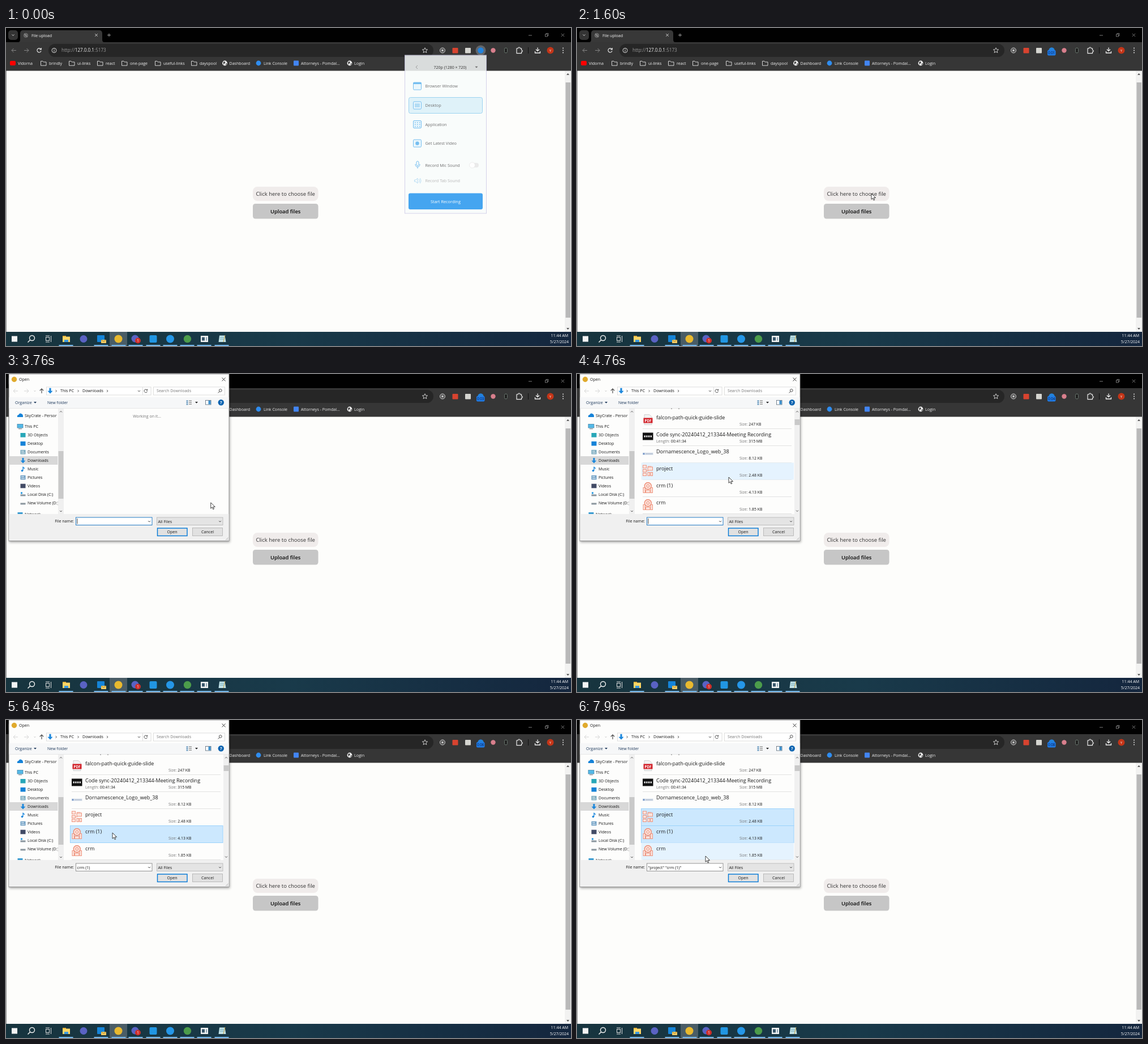
An HTML page that plays this animation: 998 px wide and 561 px high, repeating every 8 s.

```html
<!DOCTYPE html>
<html lang="en">
<head>
<meta charset="utf-8">
<title>File upload</title>
<style>
  html, body { margin: 0; width: 100%; height: 100%; overflow: hidden; background: #fdfdfb; }
  svg { display: block; width: 100vw; height: 100vh; }
  text { font-family: "Open Sans", "Noto Sans", sans-serif; white-space: pre; }
</style>
</head>
<body>
<svg id="stage" viewBox="0 0 998 561"></svg>
<script>
const LOOP = 8000;
const INK = '#1a1a1a';

const rect = (x, y, w, h, fill, extra = '') =>
  `<rect x="${x}" y="${y}" width="${w}" height="${h}" fill="${fill}" ${extra}/>`;
const disc = (x, y, r, fill, extra = '') =>
  `<circle cx="${x}" cy="${y}" r="${r}" fill="${fill}" ${extra}/>`;
const line = (d, stroke = INK, width = 1, extra = '') =>
  `<path d="${d}" fill="none" stroke="${stroke}" stroke-width="${width}" ${extra}/>`;
const shape = (d, fill, extra = '') => `<path d="${d}" fill="${fill}" ${extra}/>`;
const text = (x, y, s, fill = INK, size = 7.1, extra = '') =>
  `<text x="${x}" y="${y}" fill="${fill}" font-size="${size}" ${extra}>${s}</text>`;
const group = (id, body, extra = '') => `<g id="${id}" ${extra}>${body}</g>`;
const MID = 'text-anchor="middle"';
const END = 'text-anchor="end"';

const chevron = (x, y, color = '#444', r = 2) => line(`M${x - r} ${y - r / 2}l${r} ${r}l${r} ${-r}`, color, 0.9);
const chevronUp = (x, y, color = '#444', r = 2) => line(`M${x - r} ${y + r / 2}l${r} ${-r}l${r} ${r}`, color, 0.9);
const chevronRight = (x, y, color = '#444') => line(`M${x - 1} ${y - 2}l2 2l-2 2`, color, 0.9);
const triangle = (x, y, color, dir = 1) => shape(`M${x - 2.5} ${y - 1.3 * dir}h5l-2.5 ${2.8 * dir}z`, color);
const cross = (x, y, color, r = 3) => line(`M${x - r} ${y - r}l${2 * r} ${2 * r}m0 ${-2 * r}l${-2 * r} ${2 * r}`, color, 0.9);
const lens = (x, y, r, color, w) => disc(x, y, r, 'none', `stroke="${color}" stroke-width="${w}"`);
const arrow = (x, y, dx, color) => line(`M${x - 4 * dx} ${y}h${8 * dx}m${-3.5 * dx} -3.5l${3.5 * dx} 3.5l${-3.5 * dx} 3.5`, color, 1);
const downArrow = (x, y, s = 1) =>
  shape(`M${x - 1.6 * s} ${y - 5 * s}h${3.2 * s}v${5 * s}h${3 * s}l${-4.6 * s} ${5 * s}l${-4.6 * s} ${-5 * s}h${3 * s}z`, '#1e88dc');

function globe(x, y, color = '#f1f1f1') {
  return disc(x, y, 4.4, color) + shape(`M${x - 3} ${y - 2}l3 -1l1 2l-2 2l-1 2z`, '#444') + shape(`M${x + 1} ${y + 2}l2 -2l1 1l-2 2z`, '#444');
}

function bookmark([kind, x, label]) {
  const icons = {
    red: rect(x - 14, 58, 10, 8, '#f00', 'rx="2"'),
    folder: line(`M${x - 14.5} 58.5h3.5l1.2 1.5h4.8v6.2h-9.5z`, '#e4e4e4', 0.9),
    globe: globe(x - 8, 62),
    blue: disc(x - 9, 62, 4.4, '#2f8df0'),
    square: rect(x - 13, 57.5, 9, 9, '#4285f4', 'rx="1"')
  };
  return icons[kind] + text(x, 65, label, '#f0f0f0');
}

function browser() {
  const marks = [
    ['red', 21, 'Vidorna'], ['folder', 76, 'brindly'], ['folder', 126, 'ui-links'],
    ['folder', 176, 'react'], ['folder', 219, 'one-page'], ['folder', 278, 'useful-links'],
    ['folder', 342, 'dayspool'], ['globe', 394.5, 'Dashboard'], ['blue', 455, 'Link Console'],
    ['square', 521, 'Attorneys - Pomdal...'], ['globe', 615, 'Login']
  ];
  const star = 'M740 34.8l1.3 3l3.3 .3l-2.5 2.2l.8 3.2l-2.9 -1.7l-2.9 1.7l.8 -3.2l-2.5 -2.2l3.3 -.3z';
  return [
    rect(0, 0, 998, 26, '#010101'),
    rect(4, 4, 17, 17, '#343434', 'rx="5"'), chevron(12.5, 12.5, '#eee'),
    shape('M20 25.5q5 0 5 -5v-11q0 -5.5 5.5 -5.5h134q5.5 0 5.5 5.5v11q0 5 5 5z', '#383838'),
    disc(35, 13, 4.3, '#666'), line('M32 10l6 6', '#aaa', 0.9),
    text(45, 15.6, 'File upload', '#f4f4f4'),
    cross(159.5, 12.5, '#eee', 2.2), line('M179 12.5h6m-3 -3v6', '#aaa', 0.9),
    line('M923 13h6', '#888', 0.9), rect(952.5, 11, 4, 4, 'none', 'stroke="#888" stroke-width=".8"'),
    line('M954 11v-1.5h4v4h-1.5', '#888', 0.8), cross(983.5, 12.5, '#888', 2.6),
    rect(0, 25, 998, 50.5, '#363636'),
    rect(75, 28, 680, 23, '#262626', 'rx="11.5"'),
    arrow(14, 39.5, -1, '#858585'), arrow(36, 39.5, 1, '#858585'),
    line('M61.6 37.5a3.6 3.6 0 1 0 .4 3M62.3 35v3h-3', '#eee', 1.1),
    disc(85, 39.5, 4, 'none', 'stroke="#ddd"'), line('M85 38.7v3M85 36.8v1', '#ddd', 1),
    text(98, 42.4, '<tspan>http://</tspan><tspan fill="#f2f2f2">127.0.0.1</tspan>:5173', '#9a9a9a', 8.1),
    line(star, '#ddd', 0.9),
    disc(771, 39.5, 4.5, '#555', 'stroke="#ccc"'), disc(771, 39.5, 1.7, '#ccc'),
    rect(788.5, 35, 10, 9.5, '#d8432f', 'rx="1"'), rect(811, 35, 10, 9.5, '#d5d5d0', 'rx="1"'),
    group('extHalo', disc(838.5, 39.5, 9, '#62666b')),
    disc(838.5, 39.5, 5.2, '#2383dc'),
    group('badge', rect(831, 39, 14.5, 9.5, '#1f7be6', 'rx="2"') + text(838.2, 46.3, '0:01', '#0a1d4a', 6.3, `${MID} id="badgeText"`)),
    disc(860.5, 39.5, 4.2, '#d97f8d'), rect(880.5, 35, 5, 9, '#202020', 'rx="2.5" stroke="#6a776f"'),
    line('M902 36h2.5q0 -2 1.8 -2t1.8 2h2.4v3q1.8 0 1.8 1.6t-1.8 1.6v2.5h-8.5z', '#eee', 1.2),
    rect(922, 34, 1, 11, '#111'),
    line('M939 34.5v6m-3 -2.8l3 3l3 -3M934.5 41v3h9v-3', '#f0f0f0', 1.3),
    disc(961.5, 39.5, 6, '#c43518'), text(961.5, 41.7, 'Y', '#fff', 6, MID),
    [35.5, 39.5, 43.5].map(y => disc(984, y, 0.9, '#eee')).join(''),
    marks.map(bookmark).join('')
  ].join('');
}

function page() {
  return [
    rect(0, 75, 998, 461, '#fdfdfb'), rect(0, 75, 0.8, 461, '#777'),
    rect(987, 75.5, 11, 460.5, '#f2f2f1'), rect(988.5, 96, 8.5, 415, '#b9b9b9'),
    triangle(992.5, 81.5, '#444', -1), triangle(992.5, 530.5, '#444'),
    rect(436, 280, 115.5, 25, '#f0eceb', 'rx="8"'),
    text(493.7, 296.4, 'Click here to choose file', '#333', 9.5, MID),
    rect(436, 310, 115.5, 26.5, '#c6c6c6', 'rx="4.5"'),
    text(493.7, 327.3, 'Upload files', '#0a0a0a', 9.4, `${MID} font-weight="600"`)
  ].join('');
}

function taskbar() {
  const running = [106, 168, 199, 229, 260, 290, 320, 350, 381];
  return [
    rect(0, 536, 998, 25, 'url(#bar)'),
    rect(183, 536, 31, 25, '#4a5d66'),
    running.map(x => rect(x - 12.5, 559, 25, 2, '#76b9ed')).join(''),
    rect(10, 543.5, 10, 10, '#f4f4f4'),
    lens(46, 547, 4.5, '#f4f4f4', 1.4), line('M42.8 550.2l-4.3 4.3', '#f4f4f4', 1.5),
    rect(70.5, 545.5, 6, 6, 'none', 'stroke="#ddd"'), line('M70 543h7M70 554h7M79.5 543v11', '#ddd', 1),
    rect(100, 543, 6, 4, '#e8a92c'), rect(100, 544.5, 13, 9.5, '#fbd667'), rect(103, 550, 7, 4, '#3d9be0'),
    disc(137, 548.5, 6.5, '#5a62c3'),
    rect(161, 542, 13, 12, '#1584d8', 'rx="1"'), rect(168, 550, 9, 6, '#f2ca62'), line('M168 550l4.5 3l4.5 -3', '#8b6a1c', 0.7),
    disc(198.5, 548.5, 7, '#e9b92f'),
    disc(228, 548, 6.5, '#5a62c3'), disc(233, 551.5, 5, '#cf2f2b'), text(233, 554, '1', '#fff', 6.8, MID),
    rect(253.5, 542, 13, 13, '#2196e3', 'rx="2"'), disc(290, 548.5, 7, '#2597e8'), disc(320.5, 548.5, 6.7, '#4c9c4b'),
    rect(344, 543, 13, 11, '#f0f2f2'), rect(346, 545.5, 5, 6, '#38566b'), rect(353, 545.5, 2, 6, '#8aa3b1'),
    shape('M377 542.5h9.5l2 11.5h-13z', '#c2e3e8'), line('M378 546h7m-7.5 3h7.5', '#5b97a8', 0.8), line('M387 542l-3 12', '#d0a440', 1),
    text(993, 545, '11:44 AM', '#fff', 7, END), text(994, 556.3, '5/27/2024', '#fff', 7, END)
  ].join('');
}

function recorder() {
  const blue = '#5cb3ee';
  const row = (y, label, color = '#555') => text(740.5, y + 2.7, label, color, 7.3);
  const frame = y => rect(719.5, y - 6.5, 14, 13, '#e6f5fd', `stroke="${blue}" rx="1.5"`);
  const dots = [0, 1, 2, 3, 4, 5, 6, 7, 8].map(i => rect(722 + i % 3 * 4, 166 + (i / 3 | 0) * 3.5, 1.5, 1.5, blue)).join('');
  return [
    rect(704.5, 48, 144, 279, '#f9fcfc', 'stroke="#ccc9e6"'),
    line('M727 66l-3 3l3 3', '#999', 0.8), text(784.5, 72, '720p (1280 × 720)', '#333', 7, MID), triangle(831, 69, '#777'),
    frame(102.5), rect(719.5, 96, 14, 3, blue), row(102.5, 'Browser Window'),
    rect(711.5, 122.5, 130, 28, '#daf0f9', 'rx="3" stroke="#8acbef"'), frame(136.5), rect(722, 133, 9, 7, '#a7d7f4'), row(136.5, 'Desktop'),
    frame(170), dots, row(170, 'Application'),
    frame(203.5), disc(726.5, 203.5, 3.2, blue), row(203.5, 'Get Latest Video'),
    rect(725, 235, 4, 8, 'none', `rx="2" stroke="${blue}"`), line('M723 240q0 5 4 5t4 -5M727 245v3', blue), row(242, 'Record Mic Sound'),
    rect(819, 238, 16, 8, '#e7e7e7', 'rx="4"'), disc(823.5, 242, 5, '#fff', 'stroke="#ddd" stroke-width=".6"'),
    line('M721.5 268h2.5l3 -3v9l-3 -3h-2.5zM729.5 266.5q2 3 0 6M731.5 265q3 4.5 0 9', '#9fd1f1', 0.9), row(269.5, 'Record Tab Sound', '#aaa'),
    rect(711, 291.5, 131, 28.5, '#2295ee', 'rx="3"'), text(776.5, 308.6, 'Start Recording', '#fff', 7.4, MID)
  ].join('');
}

function sidebar() {
  const items = [
    ['3D Objects', '#27a7b8'], ['Desktop', '#1683d8'], ['Documents', '#79a9bd'], ['Downloads', ''], ['Music', ''],
    ['Pictures', '#6f9fc4'], ['Videos', '#424b66'], ['Local Disk (C:)', '#8b969e'], ['New Volume (D:)', '#8b969e']
  ];
  const icon = (i, y, color) => {
    if (i === 3) return downArrow(30, y, 0.95);
    if (i === 4) return disc(28.5, y + 3, 1.8, '#1e88dc') + line(`M30 ${y + 3}v-7q0 2 3 3`, '#1e88dc', 1.3);
    if (i > 6) return rect(25.5, y, 9, 3, color) + (i === 7 ? rect(26, y - 4, 3, 3, '#2a9be2') : '');
    return rect(25.5, y - 3.8, 9, 7.6, color) + (i === 2 || i === 5 ? line(`M27 ${y - 1.5}h5m-5 3h6`, '#fff', 1) : '');
  };
  return '<g clip-path="url(#sideClip)">' + [
    rect(5, 145, 86.5, 15, '#d8d8d8'),
    shape('M20 76q-1 -3.5 2.3 -4q2 -4 5.5 -1.5q2.5 .5 2.2 5.5z', '#1683d8'), text(33, 75.5, 'SkyCrate - Persor'),
    rect(20, 88.5, 10, 6.5, '#53b9e8', 'stroke="#3a7a9c" stroke-width=".7"'), rect(22, 96.3, 6, 0.9, '#567'), text(33, 95.2, 'This PC'),
    items.map(([label, color], i) => icon(i, 107.8 + i * 14.95, color) + text(38, 110.4 + i * 14.95, label)).join(''),
    rect(20.5, 244, 9, 6, '#3a9bd0'), text(33, 250, 'Network')
  ].join('') + '</g>' + rect(92, 61, 10, 186, '#f0f0f0') + rect(92.5, 136, 9, 84, '#c9c9c9') + chevronUp(97, 66.5) + chevron(97, 242);
}

const ROWS = [
  ['pdf', 'falcon-path-quick-guide-slide', '247 KB'],
  ['video', 'Code sync-20240412_213344-Meeting Recording', '315 MB'],
  ['image', 'Dornamescence_Logo_web_38', '8.12 KB'],
  ['boxes', 'project', '2.48 KB'],
  ['gear', 'crm (1)', '4.13 KB'],
  ['gear', 'crm', '1.85 KB']
];
const rowTop = i => 66.5 + i * 30;

function fileIcon(kind, y) {
  const coral = '#ee8a72';
  const box = (x, dy, w, h) => rect(x, y + dy, w, h, '#fbe4dd', `stroke="${coral}" stroke-width=".9"`);
  switch (kind) {
    case 'pdf': return shape(`M119 ${y + 5}h9l4 4v14h-13z`, '#f2f2f2', 'stroke="#bbb" stroke-width=".6"') +
      rect(117.5, y + 11, 16, 9, '#d2232a') + text(125.5, y + 18, 'PDF', '#fff', 6.2, `${MID} font-weight="700"`);
    case 'video': return rect(116, y + 7, 18.5, 13, '#111') + [0, 1, 2, 3].map(i => rect(118.5 + i * 3.7, y + 12, 2.4, 3, '#eee')).join('');
    case 'image': return rect(116, y + 12, 18.5, 4.5, '#dce4ee') + rect(116.5, y + 13, 3, 2.5, '#6d8fc3') + line(`M121 ${y + 14.3}h13`, '#9eacbf', 1);
    case 'boxes': return line(`M123 ${y + 14.5}h2.5v-8h6`, coral, 0.8) +
      box(116.5, 4.5, 6, 5) + box(116.5, 12, 6, 4.5) + box(116.5, 18.5, 6, 4.5) + box(125, 7.5, 8.5, 6) + box(125, 17, 3.5, 6) + box(130, 17, 3.5, 6);
    default: return disc(125.3, y + 11, 6, '#fbe4dd', `stroke="${coral}" stroke-width="1.4"`) + disc(125.3, y + 11, 2.5, 'none', `stroke="${coral}"`) +
      box(117, 14, 3.5, 9) + box(130, 14, 3.5, 9) + box(121.5, 18.5, 7.5, 4.5);
  }
}

function fileList() {
  const rows = ROWS.map(([kind, name, size], i) => {
    const y = rowTop(i);
    return line(`M116 ${y + 30}h263`, '#dcdcdc', 0.8) +
      rect(113.5, y, 269.5, 30, 'none', `id="row${i}"`) + fileIcon(kind, y) +
      text(140, y + 13.1, name, INK, 9) +
      (kind === 'video' ? text(140, y + 24.3, '<tspan fill="#777">Length: </tspan>00:41:34', INK, 6.9) : '') +
      text(287, y + 24.3, `<tspan fill="#777">Size: </tspan>${size}`, INK, 6.9);
  }).join('');
  return `<g clip-path="url(#listClip)">${line('M166 61h2m11 0h2', '#444', 0.9)}${rows}</g>` +
    rect(384, 61, 9.5, 186, '#f0f0f0') + rect(384.5, 80, 9, 10, '#c9c9c9') + chevronUp(389, 66.5) + chevron(389, 241.5);
}

function dialog() {
  return [
    rect(5, 0, 389, 294.5, '#fdfdfc', 'stroke="#777" stroke-width=".8" filter="url(#shadow)"'),
    disc(14.5, 9.5, 4.7, '#e0aa2d'), text(23, 12.3, 'Open'), cross(384.5, 9.5, '#222'),
    arrow(17, 30, -1, '#d5d5d5'), arrow(36, 30, 1, '#d5d5d5'), chevron(51, 30, '#bbb', 1.4),
    line('M63 34v-8m-3.3 3.3l3.3 -3.3l3.3 3.3', '#444', 1.1),
    rect(71.5, 23, 184.5, 14, '#fff', 'stroke="#d6d6d6" stroke-width=".8"'), downArrow(78, 29.7),
    chevronRight(88.5, 30), text(96, 32.4, 'This PC'), chevronRight(127.5, 30), text(135, 32.4, 'Downloads'), chevronRight(179, 30),
    chevron(235, 30), line('M241.5 23v14', '#d6d6d6', 0.8), line('M249.3 28.5a2.8 2.8 0 1 0 .3 2M249.8 26.5v2.3h-2.3', '#444', 0.9),
    rect(260.5, 23, 126, 14, '#fff', 'stroke="#d6d6d6" stroke-width=".8"'), text(266, 32.4, 'Search Downloads', '#777'),
    lens(378.8, 29, 2.4, '#444', 0.9), line('M377 31l-2.5 2.5', '#444', 1),
    rect(5.5, 41, 388, 19.5, '#f6f7f8'), line('M5.5 60.5h388', '#e3e3e3', 0.8),
    text(16, 53, 'Organize', '#1e395b'), triangle(51.5, 50.3, '#1e395b'), text(73, 53, 'New folder', '#1e395b'),
    [0, 1, 2].map(i => rect(318.5, 46.5 + i * 3, 3, 2, '#5b8fb9') + rect(323, 46.5 + i * 3, 5, 1.5, '#999')).join(''),
    triangle(336.5, 50.3, '#222'),
    rect(352.5, 46.5, 9.5, 7.5, '#fff', 'stroke="#567" stroke-width=".8"'), rect(357.5, 47, 4.2, 6.5, '#3f91cd'),
    disc(379.8, 50.3, 5.2, '#0a63b0'), text(379.8, 53.2, '?', '#fff', 7.8, `${MID} font-weight="700"`),
    sidebar(),
    group('loading', text(249, 77, 'Working on it...', '#777', 7.1, MID)),
    group('files', fileList()),
    rect(5.5, 247, 388, 47, '#f0f0f0'),
    text(120, 262.3, 'File name:', INK, 7.1, END),
    rect(123.5, 253, 134.5, 13.5, '#fff', 'id="nameField" stroke-width=".9"'), chevron(253, 260),
    group('caret', rect(125.5, 255, 0.8, 9.5, '#111')), text(125.5, 262.5, '', INK, 7.1, 'id="fileName"'),
    rect(266.5, 253, 116.5, 13.5, '#e4e4e4', 'stroke="#b5b5b5" stroke-width=".8"'), text(268.5, 262.5, 'All Files'), chevron(378, 260),
    rect(267.5, 272, 52.5, 13.5, '#e1e1e1', 'stroke="#0078d7" stroke-width="1.4"'), text(293.5, 281.3, 'Open', INK, 7.1, MID),
    rect(329.5, 271.5, 53, 14, '#e1e1e1', 'stroke="#b0b0b0" stroke-width=".8"'), text(356, 281.3, 'Cancel', INK, 7.1, MID),
    line('M388 293l4.5 -4.5m-2 4.5l2 -2', '#aaa', 0.8)
  ].join('');
}

const defs = `<defs>
  <linearGradient id="bar"><stop offset="0" stop-color="#17343e"/><stop offset=".5" stop-color="#193a4a"/><stop offset="1" stop-color="#14263e"/></linearGradient>
  <filter id="shadow" x="-5%" y="-5%" width="110%" height="112%"><feDropShadow dx="1" dy="2" stdDeviation="2" flood-opacity=".35"/></filter>
  <clipPath id="sideClip"><rect x="5" y="61" width="86.5" height="186"/></clipPath>
  <clipPath id="listClip"><rect x="103" y="60.5" width="281" height="186.5"/></clipPath>
</defs>`;

document.getElementById('stage').innerHTML = defs + page() + browser() + taskbar() +
  group('recorder', recorder()) + group('dialog', dialog()) +
  group('cursor', shape('M0 0v10.3l2.4 -2.2l1.7 3.8l1.7 -.8l-1.7 -3.6h3.4z', '#fff', 'stroke="#111" stroke-width=".8"'));

const $ = id => document.getElementById(id);
const show = (id, on) => $(id).setAttribute('visibility', on ? 'inherit' : 'hidden');

// Cursor stops: time, x, y
const PATH = [
  [120, 770, 305], [1250, 520, 292], [3300, 520, 292], [3760, 362, 227], [4200, 268, 182],
  [5150, 268, 182], [5720, 193, 212], [6300, 190, 206], [7100, 181, 166], [7420, 181, 166], [7960, 227, 240]
];

// Monotone cubic through the stops: passes moving points smoothly, never overshoots a rest
function slopeAt(i, axis) {
  if (i === 0 || i === PATH.length - 1) return 0;
  const step = k => (PATH[k + 1][axis] - PATH[k][axis]) / (PATH[k + 1][0] - PATH[k][0]);
  const a = step(i - 1), b = step(i);
  return a * b > 0 ? 2 * a * b / (a + b) : 0;
}

function cursorAt(t, axis) {
  const i = PATH.findIndex(p => p[0] > t);
  if (i <= 0) return PATH.at(i)[axis];
  const span = PATH[i][0] - PATH[i - 1][0], u = (t - PATH[i - 1][0]) / span, v = 1 - u;
  return v * v * (1 + 2 * u) * PATH[i - 1][axis] + u * u * (1 + 2 * v) * PATH[i][axis] +
    u * v * span * (v * slopeAt(i - 1, axis) - u * slopeAt(i, axis));
}

function selectionAt(t) {
  if (t < 5050) return [[], ''];
  if (t < 6100) return [[3], 'project'];
  if (t < 7350) return [[4], 'crm (1)'];
  return [[3, 4], '"project" "crm (1)"'];
}

function render(t) {
  const fade = 0.84 * Math.min(1, Math.max(0, 1 - (t - 40) / 160));
  $('recorder').setAttribute('opacity', fade);
  show('extHalo', fade > 0);
  show('badge', t >= 850);
  $('badgeText').textContent = '0:0' + Math.floor((t + 150) / 1000);

  const loaded = t >= 4240;
  show('dialog', t >= 3480);
  show('loading', !loaded);
  show('files', loaded);

  const x = cursorAt(t, 1), y = cursorAt(t, 2);
  show('cursor', t >= 120);
  $('cursor').setAttribute('transform', `translate(${x} ${y})`);

  const [selected, name] = selectionAt(t);
  ROWS.forEach((_, i) => {
    const chosen = selected.includes(i);
    const hover = x > 113 && x < 383 && y >= rowTop(i) && y < rowTop(i) + 30;
    const row = $('row' + i);
    row.setAttribute('fill', chosen ? '#cce8fe' : hover ? '#e5f3fe' : 'none');
    row.setAttribute('stroke', chosen ? '#9bd2fb' : 'none');
  });
  $('fileName').textContent = name;
  $('nameField').setAttribute('stroke', name ? '#8a8a8a' : '#0f6fc0');
  show('caret', !name);
}

const start = performance.now();
function tick() {
  render((performance.now() - start) % LOOP);
  requestAnimationFrame(tick);
}
tick();
</script>
</body>
</html>
```
